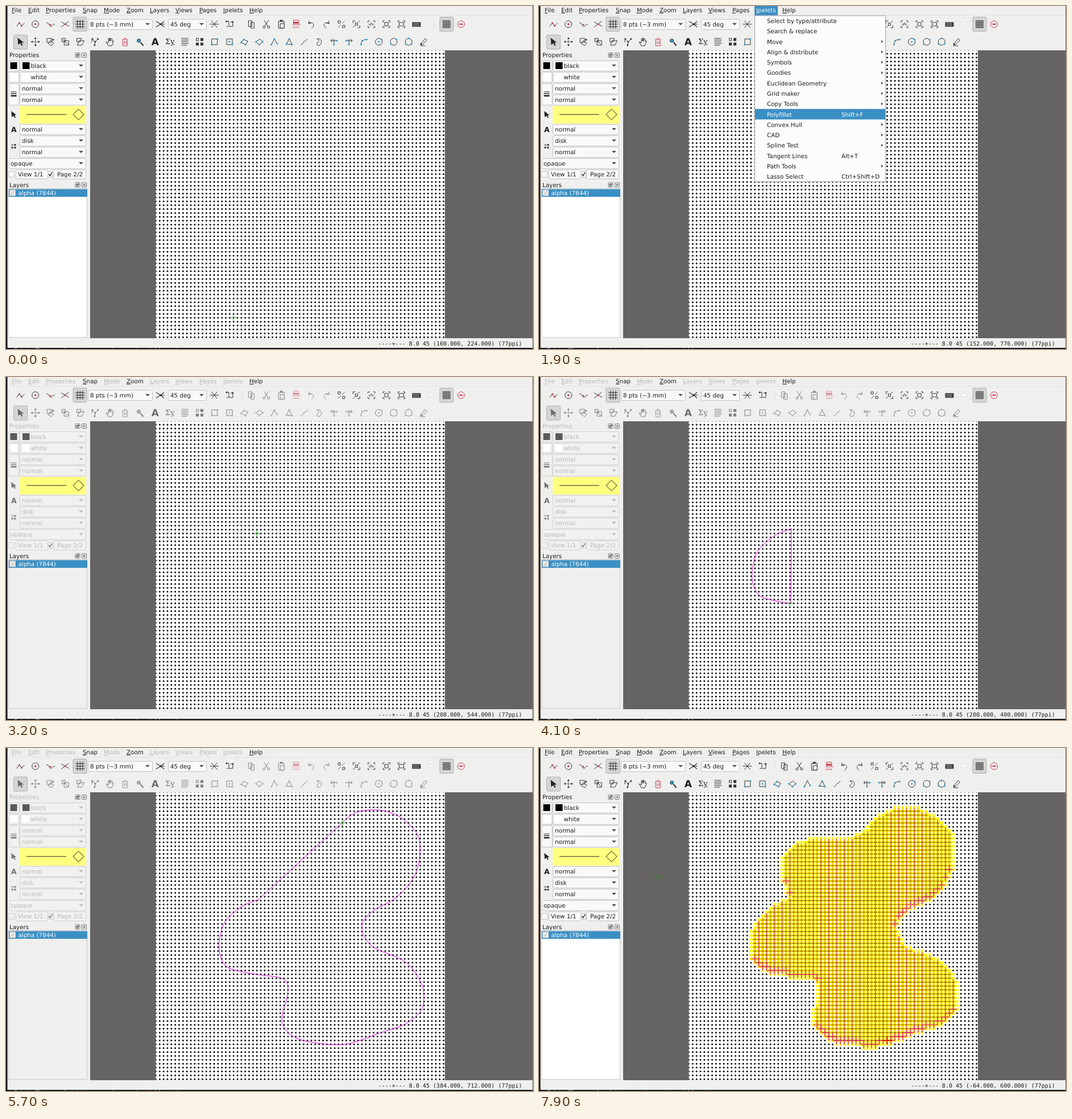
Write an HTML page with a canvas that moves like this. It is 927 px wide and 604 px high and loops after 8 s.

```html
<!DOCTYPE html>
<html lang="en">
<head>
<meta charset="utf-8">
<title>Lasso select</title>
<style>
html, body { margin: 0; width: 100%; height: 100%; overflow: hidden; background: #efefee; }
svg, canvas { position: absolute; left: 0; top: 0; }
#view { left: 148px; top: 78px; }
text { font: 10.35px "DejaVu Sans", sans-serif; fill: #1c1c1c; text-rendering: geometricPrecision; white-space: pre; }
.key { text-decoration: underline; }
#status { font: 10.03px "DejaVu Sans Mono", monospace; }
.icon { fill: none; stroke: #333; }
.icon text { stroke: none; }
.box { fill: #f9f9f9; stroke: #c3c3c1; }
.tri { fill: #555; }
.white { fill: #fff; }
.off .dim text, .off text.dim { fill: #b8b8b7; }
.off .dim .box { fill: #f1f1f0; stroke: #d0d0ce; }
.off .dim .tri { fill: #bbb; }
.off .swatch { fill: #5b5a58; }
.off .paper { fill: #efefee; }
.off .fade { filter: grayscale(1); opacity: .6; }
.off .soft { opacity: .55; }
</style>
</head>
<body>
<svg id="chrome" width="927" height="604"></svg>
<canvas id="view" width="778" height="507"></canvas>
<svg id="popup" width="927" height="604"></svg>
<script>
const $ = id => document.getElementById(id);
const RED = '#c8384c', BLUE = '#2e9bd0', HILITE = '#3a8fc3';

// ---- SVG helpers ----
const rect = (x, y, w, h, attrs = '') => `<rect x="${x}" y="${y}" width="${w}" height="${h}" ${attrs}/>`;
const label = (x, y, s, attrs = '') => `<text x="${x}" y="${y}" ${attrs}>${s}</text>`;
const path = (d, color, attrs = '') => `<path d="${d}" ${color ? `stroke="${color}"` : ''} ${attrs}/>`;
const ring = (r, x = 0, y = 0, color = '#333') => `<circle cx="${x}" cy="${y}" r="${r}" stroke="${color}"/>`;
const spot = (x, y, color = BLUE, r = 1.5) => `<circle cx="${x}" cy="${y}" r="${r}" fill="${color}" stroke="none"/>`;
const solid = (d, color = '#222') => path(d, '', `fill="${color}" stroke="none"`);
const icon = (x, y, body) => `<g class="icon" transform="translate(${x} ${y})">${body}</g>`;
const pressed = (x, y) => rect(x - 12, y - 12.5, 24, 25, 'rx="2" fill="#d5d5d3" stroke="#b0b0ae"');
const row = (y, x0, step, list) => list.map((s, i) => icon(x0 + i * step, y, s)).join('');
const group = (cls, body) => `<g class="${cls}">${body}</g>`;
const combo = (x, y, w, s, tx = x + 4) =>
  rect(x + .5, y - 8.5, w - 1, 18, 'class="box" rx="2"') + label(tx, y + 4, s) +
  `<path class="tri" d="M${x + w - 13} ${y - 2}h8l-4 4z"/>`;

// ---- Menu bar ----
const menus = { File: 10, Edit: 39, Properties: 70, Snap: 135, Mode: 172, Zoom: 212,
  Layers: 253, Views: 298, Pages: 340, Ipelets: 382, Help: 428 };
const menuBar = Object.entries(menus).map(([s, x]) =>
  label(x, 11, `<tspan class="key">${s[0]}</tspan>${s.slice(1)}`,
    /Snap|Zoom|Help/.test(s) ? '' : 'class="dim"')).join('');

// ---- Toolbars ----
const gridLines = (n, step, reach) => {
  let d = '';
  for (let i = -n; i <= n; i += step) d += `M${i}-${reach}V${reach}M-${reach} ${i}H${reach}`;
  return d;
};
const corners = 'M-6-3V-6H-3M3-6H6V-3M6 3V6H3M-3 6H-6V3';
const arrow = 'M-5-7L6 1.5H1.5L4 6L2 7L-.5 2.5L-4 5.5Z';
const marks = [-4, 4].map(x => [-4, 4].map(y => rect(x - 2, y - 2, 4, 4,
  x < 0 && y < 0 ? 'fill="none"' : 'fill="#333"')).join('')).join('');

const snaps = [
  path('M-7 4L-2-2L2 3L7-2') + spot(-2, -2, RED) + spot(2, 3, RED),
  ring(6) + spot(0, 0, RED, 1.8),
  path('M-7-2C-3-6 -1 8 3 3S6 0 8 1') + spot(0, 1, RED),
  path('M-7-4L7 4M-7 5L6-5') + spot(0, 0, RED),
  path(gridLines(4.5, 4.5, 8))
];
const angleSnap = path('M-7-5L1 0L-7 5M1 0L7-5M1 0L7 5M-1 0H8', '', 'stroke-width="1.2"') + spot(1, 0, '#222', 1.5);
const starSnap = path('M-8 0H8M-5-6L5 6M-5 6L5-6');
const autoSnap = path('M-5-5H-1V4H6V-4H2M-5 4H-2') + spot(-5, -5, '#333') + spot(6, -4, '#333');
const edits = [
  path('M-5-6H1V4H-5ZM-1-3H5V7H-1Z', '', 'fill="#eee"'),
  path('M-4-7L3 4M4-7L-3 4') + ring(2, -4, 5) + ring(2, 4, 5),
  path('M-5-5H5V7H-5Z') + rect(-2, -1, 7, 8, 'fill="#eee"') + rect(-2, -7, 4, 2, 'fill="#333"'),
  path('M-5 0V-7H4V0M-7 1H7M-5 4V7M-2 4V7M1 4V7M4 4V7', RED) + rect(-5, -4, 9, 3, `fill="${RED}" stroke="none"`),
  path('M-4-6L-5-1L0-2M-5-1C1-7 9 3 0 7'),
  path('M4-6L5-1L0-2M5-1C-1-7 -9 3 0 7')
];
const zooms = [
  path('M-6-6H-2V-2H-6ZM6 6H2V2H6Z') + path('M-1 1L-6 6M1-1L6-6', '', 'stroke-dasharray="2 1"'),
  path('M-6-2V-6H-2M6 2V6H2') + rect(-2, -2, 4, 4) + path('M3-3L6-6M-3 3L-6 6'),
  path(corners) + path('M-3 3L0-3L3 3M-5 0H5', '', 'stroke-dasharray="2 1"'),
  path(corners) + rect(-3, -3, 6, 6),
  path(corners) + rect(-4, -3, 8, 6),
  rect(-7, -3, 14, 7, 'fill="#444"') + path('M-5-1H5M-5 2H5', '#ddd', 'stroke-dasharray="1.5 1"')
];
const tools = [
  solid(arrow),
  path('M0-6V6M-6 0H6', '', 'stroke-dasharray="2 1"') + solid('M0-8L2-5H-2ZM0 8L2 5H-2ZM-8 0L-5-2V2ZM8 0L5-2V2Z'),
  path('M-6-6H2V1H-6ZM0-2L6 2L2 7L-4 3Z') + solid('M4-6L7-3L3-2Z'),
  path('M-6-6H0V0H-6ZM-2-2H6V6H-2Z') + path('M-4-4L5 5'),
  path('M-6-6H2L0 0H-6ZM-2-2H7L3 6H-5Z'),
  path('M-5-5L0 0L5-5M0 0L-1 7M-5-5L-6 1') + [[-5, -5], [0, 0], [5, -5], [-1, 6]].map(p => spot(...p, '#333')).join(''),
  path('M-3 7L-7 0L-3 2V-5Q-2-7 -1-5V-1V-6Q0-8 1-6V-1V-5Q3-7 4-4V0Q6-3 6 0L3 7Z'),
  path('M-5-4H5M-2-6H2M-4-4V7H4V-4M-1-1V4M2-1V4', RED),
  path('M1 1L6 7', '', 'stroke-width="2"') + `<circle cx="-2" cy="-2" r="3" fill="${BLUE}"/>`,
  label(-6.2, 6, 'A', 'style="font-size:17px;font-weight:bold"'),
  label(-8, 4, 'Σy', 'style="font:13px \'DejaVu Serif\',\'Noto Serif\',serif"') + spot(7, 5, '#333', 1),
  path('M-6-6H6M-6-3H7M-6 0H6M-6 3H7M-6 6H4'),
  marks,
  path('M-5-5H5V5H-5Z') + spot(-5, 5) + spot(5, -5),
  path('M-5-5H5V5H-5Z') + spot(0, 0) + spot(5, 5),
  path('M-6 1L-1-4L6-1L2 5Z') + spot(-6, 1) + spot(-1, -4) + spot(2, 5),
  path('M-6 0L1-5L6 0L0 5Z') + spot(-6, 0) + spot(6, 0) + spot(0, 5),
  path('M-5 5L0-5L5 3') + spot(-5, 5) + spot(0, -5) + spot(5, 3),
  path('M-5 4L0-5L5 5Z') + spot(-5, 4) + spot(0, -5) + spot(5, 5),
  path('M-6 5C-2 6 -2-1 1-1S3-5 6-4'),
  path('M-4-5C4-7 7 2 1 6C-5 8 -5 2 -1 0C1-2 -2-4 -4-5'),
  path('M-6-2H5M0-5V5') + path('M-6-2L-3-5M-6-2L-3 0') + spot(5, -2) + spot(0, 5),
  path('M6-2H-5M0-5V5') + path('M6-2L3-5M6-2L3 0') + spot(-5, -2) + spot(0, 5),
  path('M-5 5Q-5-4 5-4') + spot(-5, 5) + spot(5, -4) + spot(-3, -2),
  ring(6) + spot(0, 0) + spot(5, -4),
  ring(6) + spot(-5, 4) + spot(5, -4),
  ring(6) + spot(-5, 4) + spot(5, 4) + spot(0, -6),
  path('M-5 4L3-6L6-3L-2 5ZM-6 7H3') + solid('M-6 6L-5 2L-2 5Z')
];
const toolbars =
  pressed(130, 32) + row(32, 25.5, 26.2, snaps) +
  combo(144, 32, 114, '8 pts (~3 mm)') + icon(271, 32, angleSnap) +
  combo(285, 32, 68, '45 deg') + icon(366.5, 32, starSnap) + icon(393, 32, autoSnap) +
  path('M415.5 26V39M4.5 26V39', '#bbb', 'stroke-dasharray="1 2"') +
  group('soft', row(32, 431.5, 26.4, edits)) + row(32, 590, 26.4, zooms) +
  rect(743, 29, 10, 5, 'fill="#fafafa" stroke="#ddd"') +
  pressed(775, 32) + icon(775, 32, path(gridLines(6, 3, 6.5))) +
  icon(800.5, 32, ring(6, 0, 0, RED) + path('M-3 0H3', RED, 'stroke-width="2"')) +
  pressed(25.5, 63.5) + group('fade', row(63, 25.5, 26.26, tools));

// ---- Side panel ----
const dockHead = (y, s, cls) => label(6, y + 3.5, s, cls) +
  [126, 137.5].map((x, i) => icon(x, y, rect(-4, -4, 8, 8, 'rx="1" stroke="#777"') +
    path(i ? 'M-2-2L2 2M-2 2L2-2' : 'M-2 2V-1H1V2ZM0-2H2V0'))).join('');
const side =
  dockHead(86.5, 'Properties', 'class="dim"') +
  group('dim',
    rect(5, 96.5, 18, 18, 'class="box"') + rect(5, 116.5, 18, 18, 'class="box"') +
    rect(5, 136.5, 18, 38, 'class="box"') +
    rect(7.5, 99, 12, 12, 'class="swatch"') + rect(7.5, 119, 12, 12, 'class="white"') +
    combo(24, 105, 117, 'black', 43.5) + rect(29, 99, 12.5, 12, 'class="swatch"') +
    combo(24, 125, 117, 'white', 43.5) + rect(29, 119, 12, 12, 'class="white"') +
    [145, 165, 217, 257].map(y => combo(24, y, 117, 'normal')).join('') +
    combo(24, 237, 117, 'disk') + combo(5, 277, 136, 'opaque', 8) +
    rect(17.5, 288.5, 56, 16, 'class="box" rx="2"') + label(21, 300, 'View 1/1') +
    rect(83.5, 288.5, 57, 16, 'class="box" rx="2"') + label(90, 300, 'Page 2/2') +
    rect(4.5, 291.5, 10, 10, 'class="box"') + rect(73.5, 291.5, 9, 10, 'class="box"')) +
  group('fade',
    icon(13.5, 155, path('M-5-4H5') + path('M-5-1H5', '', 'stroke-width="1.5"') + path('M-5 3H5', '', 'stroke-width="3"')) +
    icon(13.5, 191, `<g transform="scale(.85)">${solid(arrow)}</g>`) +
    label(9, 221.5, 'A', 'style="font-size:12.5px;font-weight:bold"') +
    icon(13.5, 247, `<g transform="scale(.6)">${marks}</g>`) +
    path('M75 296L77.5 299L81 293', '#222', 'fill="none" stroke-width="1.4"')) +
  rect(24, 176, 117, 31, 'fill="#ffff80"') +
  path('M36 191H106M127.5 181.5L137 191L127.5 200.5L118 191Z', '#222', 'fill="none"') +
  dockHead(315, 'Layers', '') +
  rect(4.5, 321.5, 138, 262, 'class="white paper" stroke="#c9c9c7"') +
  rect(5, 322.5, 138, 13.5, `fill="${HILITE}"`) +
  rect(6.5, 324, 10, 10, 'fill="#ececea" stroke="#ccc"') + path('M9 329L11 331.5L14 326', '#aaa', 'fill="none"') +
  label(21.5, 333, 'alpha (7844)', 'class="white" style="fill:#fff"');

$('chrome').innerHTML =
  rect(0, 0, 927, 604, 'fill="#efefee"') + menuBar + path('M2 16.5H927', '#e2e2e0') +
  toolbars + side +
  rect(0, 0, 2.5, 604, 'fill="#14141c"') + rect(0, 602, 927, 2, 'fill="#14141c"') +
  label(2, 609.5, 's. Points. The search points are environment variables set', 'style="fill:#999"') +
  rect(926, 0, 1, 604, 'fill="#77777a"') + label(654.6, 598, '', 'id="status"');

// ---- Drop-down menu: ">" marks a submenu ----
const items = ['Select by type/attribute', 'Search &amp; replace', 'Move>', 'Align &amp; distribute>', 'Symbols>',
  'Goodies>', 'Euclidean Geometry>', 'Grid maker>', 'Copy Tools>', 'Polyfillet|Shift+F', 'Convex Hull>',
  'CAD>', 'Spline Test>', 'Tangent Lines|Alt+T', 'Path Tools>', 'Lasso Select|Ctrl+Shift+D'];
const itemY = i => 26 + i * 18.28;
const drawMenu = hover => rect(379, 0, 41, 16.5, `fill="${HILITE}"`) +
  label(382, 11, '<tspan class="key">I</tspan>pelets', 'style="fill:#fff"') +
  rect(379.5, 17, 230, 292.5, 'fill="#fcfcfc" stroke="#a0a09e"') +
  items.map((item, i) => {
    const y = itemY(i), on = i === hover, style = on ? 'style="fill:#fff"' : '';
    const [name, keys] = item.replace('>', '').split('|');
    return (on ? rect(380, y - 9.2, 229, 18.4, `fill="${HILITE}"`) : '') +
      label(401, y + 4, name, style) + (keys ? label(532, y + 4, keys, style) : '') +
      (item.endsWith('>') ? `<path fill="${on ? '#fff' : '#555'}" d="M602 ${y - 2.5}l3.5 2.5l-3.5 2.5z"/>` : '');
  }).join('');

// ---- Page and lasso ----
const ZOOM = .855, LEFT = 263.5, BASE = 740.6;
const pageX = x => LEFT + x * ZOOM, pageY = y => BASE - y * ZOOM;
const snap = v => Math.round(v / 8) * 8;
const snapX = px => snap((px - LEFT) / ZOOM), snapY = py => snap((BASE - py) / ZOOM);

const knots = [444,267, 415,279, 386,305, 376,335, 376,362, 387,384, 410,393, 450,400, 480,404, 494,413,
  495,436, 486,470, 489,492, 511,511, 550,520, 592,522.2, 622,515, 660,501, 702,486, 729,464, 735,440,
  730,413, 703,377, 650,353, 632,335, 626,317, 631,301, 650,284, 684,265, 712,236, 726,203, 726,158,
  704,130, 682,116, 655,109, 625,111, 606,119, 590,133, 573,151, 555,160, 530,165, 500,163, 480,164,
  452,173, 434,190, 429,213, 435,240, 444,267];
const last = knots.length / 2 - 1;
const knot = (i, k) => knots[2 * Math.max(0, Math.min(last, i)) + k];

// Catmull-Rom point at knot position u
function curve(u) {
  const i = Math.min(last - 1, Math.floor(u)), f = u - i;
  return [0, 1].map(k => {
    const [a, b, c, d] = [-1, 0, 1, 2].map(j => knot(i + j, k));
    return b + f * (c - a + f * (2 * a - 5 * b + 4 * c - d + f * (3 * (b - c) + d - a))) / 2;
  });
}
function lasso(end) {
  const p = new Path2D();
  for (let u = 0; u < end; u += .125) p.lineTo(...curve(u));
  p.lineTo(...curve(end));
  p.closePath();
  return p;
}

// Linear interpolation through [time, ...values] keys
function track(keys, t) {
  const i = keys.findIndex(k => k[0] > t);
  if (i < 0) return keys[keys.length - 1].slice(1);
  if (!i) return keys[0].slice(1);
  const a = keys[i - 1], b = keys[i], f = (t - a[0]) / (b[0] - a[0]);
  return a.slice(1).map((v, k) => v + (b[k + 1] - v) * f);
}
const mouse = [[0, 160, 224], [800, 152, 776], [2900, 152, 776], [3000, 200, 600], [3200, 208, 544],
  [3800, 208, 552], [7500, 208, 552], [7900, -64, 600]];
const drawing = [[3800, 0], [4900, 25], [5000, 25], [5700, 37], [6400, last]];
const hovers = [[1400, 0], [1800, 8], [1900, 9]];

const ctx = $('view').getContext('2d');

const dots = new Path2D(), yellow = new Path2D(), dashes = new Path2D(),
  evenBars = new Path2D(), oddBars = new Path2D(), crosses = new Path2D(), main = new Path2D();
const line = (p, x, y, dx, dy) => { p.moveTo(x - dx, y - dy); p.lineTo(x + dx, y + dy); };
const cross = (p, x, y, r) => { line(p, x, y, r, 0); line(p, x, y, 0, r); };

const whole = lasso(last);
const inside = (i, j) => ctx.isPointInPath(whole, pageX(i * 8), pageY(j * 8));
for (let i = 0; i < 75; i++) for (let j = 22; j < 98; j++) {
  const x = pageX(i * 8), y = pageY(j * 8);
  dots.moveTo(x, y);
  dots.arc(x, y, 1.5, 0, 7);
  if (!inside(i, j)) continue;
  cross(yellow, x, y, 9.5);
  line(dashes, x, y, 2.7, 0);
  line(i % 2 ? oddBars : evenBars, x, y - 2, 0, 4);
  if (!inside(i, j - 1)) cross(crosses, x, y, 7);
}
cross(main, pageX(408), pageY(264), 7);
ctx.translate(-148, -78);

const stroke = (p, color, width = 1) => { ctx.strokeStyle = color; ctx.lineWidth = width; ctx.stroke(p); };

function drawView(t, x, y) {
  ctx.fillStyle = '#656462';
  ctx.fillRect(148, 78, 778, 507);
  ctx.save();
  ctx.beginPath();
  ctx.rect(263.5, 78, 508.5, 507);
  ctx.clip();
  ctx.fillStyle = '#fff';
  ctx.fillRect(263, 78, 510, 507);
  ctx.fillStyle = '#000';
  ctx.fill(dots);
  ctx.restore();
  if (t >= 6900) {
    stroke(yellow, '#fff200', 4);
    stroke(oddBars, '#eaa818', .9);
    stroke(evenBars, '#dc20a0');
    stroke(dashes, '#7a4a00', 1.2);
    stroke(crosses, '#d8109c', 1.2);
    stroke(main, '#d01800', 1.8);
  } else if (t >= 3900) {
    stroke(lasso(track(drawing, t)[0]), '#d800d8');
  }
  const pointer = new Path2D();
  cross(pointer, pageX(x), pageY(y), 6.5);
  stroke(pointer, '#1f9410', .9);
}

function render(t) {
  let [x, y] = track(mouse, t).map(snap);
  if (t >= 3900 && t < 6900) {
    const tip = curve(track(drawing, t)[0]);
    x = snapX(tip[0]);
    y = snapY(tip[1]);
  }
  drawView(t, x, y);
  $('status').textContent = `----+--- 8.0 45 (${x.toFixed(3)}, ${y.toFixed(3)}) (77ppi)`;
  $('chrome').classList.toggle('off', t >= 2700 && t < 6900);
  const hover = t < 1400 ? -1 : Math.round(track(hovers, t)[0]);
  $('popup').innerHTML = t >= 1300 && t < 2400 ? drawMenu(hover) : '';
}

let shown = -1;
function tick() {
  const t = Math.floor(performance.now() % 8000 / 100) * 100;
  if (t !== shown) render(shown = t);
  requestAnimationFrame(tick);
}
tick();
</script>
</body>
</html>
```
